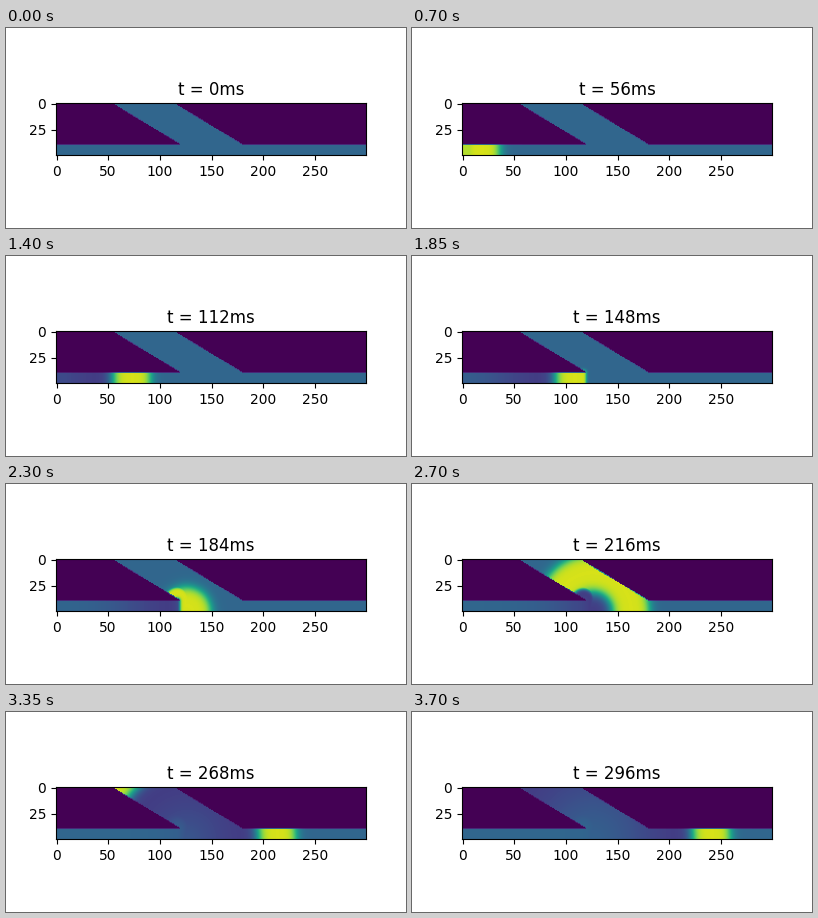
Recreate the animation shown at these times as a matplotlib script. Size 400 by 200 pixels, loop 3.75 s.

```python
import numpy as np
import matplotlib.pyplot as plt
from matplotlib.animation import FuncAnimation

FRAMES, INTERVAL, MS_PER_FRAME = 75, 50, 4
WIDTH, HEIGHT = 300, 50
FLOOR = 40                      # first row of the straight channel
SPEED, SLOWNESS = 0.98, 3.5     # cells per ms; ms per cell where it stalls
STIM_TIME, STIM_WIDTH = 19, 7
CORNER_X = 117
HUB_X, HUB_Y, HUB_TIME = 126, 50, 160
REST, PEAK, TROUGH, DURATION = 0.33, 0.94, 0.18, 37.5

y, x = np.mgrid[:HEIGHT, :WIDTH].astype(float)
channel = y >= FLOOR
slant = x - y * 5 / 3
tissue = channel | ((slant >= 55) & (slant < 114.5))


def sigmoid(v):
    return 1 / (1 + np.exp(-np.clip(v, -50, 50)))


def arrival_times():
    """Time in ms at which the wave front reaches each cell."""
    straight = STIM_TIME + np.maximum(x, STIM_WIDTH) / SPEED

    # The front stalls as the tissue widens, then spreads as a circle.
    corner_time = STIM_TIME + CORNER_X / SPEED
    to_corner = np.hypot(x - CORNER_X, np.maximum(0, FLOOR - y))
    stalled = corner_time + SLOWNESS * to_corner
    circle = HUB_TIME + np.hypot(x - HUB_X, y - HUB_Y) / SPEED

    before_corner = channel & (x < CORNER_X)
    return np.where(before_corner, straight, np.minimum(stalled, circle))


arrival = arrival_times()


def excitation(t):
    age = t - arrival
    rise = sigmoid(age / 2.8)
    fall = sigmoid((age - DURATION) / 3)
    active = REST + (PEAK - REST) * rise
    late = np.maximum(0, age - 50) / 60
    recovering = REST - (REST - TROUGH) * np.exp(-late ** 2)
    return np.where(tissue, active + (recovering - active) * fall, 0)


fig, ax = plt.subplots(figsize=(4, 2), dpi=100)
image = ax.imshow(excitation(0), cmap="viridis", vmin=0, vmax=1)
title = ax.set_title("t = 0ms")


def update(frame):
    t = frame * MS_PER_FRAME
    image.set_data(excitation(t))
    title.set_text(f"t = {t}ms")
    return image, title


anim = FuncAnimation(fig, update, frames=FRAMES, interval=INTERVAL,
                     repeat=True, repeat_delay=0)
plt.show()
```
